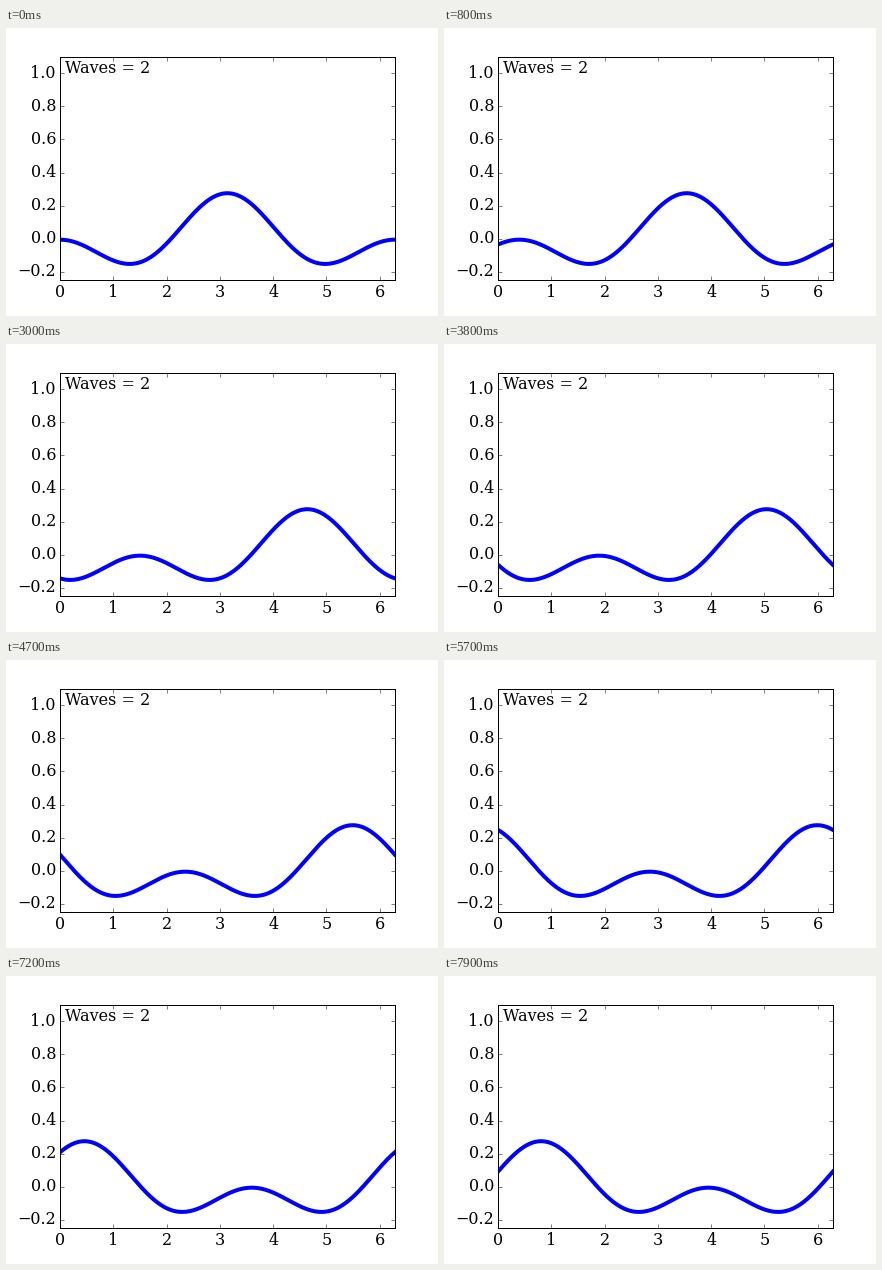
Recreate the animation shown at these times as a matplotlib script. Size 432x288 px, loop 8 s.

```python
import numpy as np
import matplotlib.pyplot as plt
from matplotlib.animation import FuncAnimation

FRAMES, INTERVAL = 80, 100
STEP = 0.05                 # phase shift per frame, in radians
AMPS = (0.1405, 0.1345)     # amplitudes of the first two harmonics

plt.style.use("classic")
plt.rcParams.update({
    "font.family": "DejaVu Serif",
    "font.size": 16,
    "xtick.labelsize": 16,
    "ytick.labelsize": 16,
    "figure.facecolor": "white",
    "figure.subplot.bottom": 0.125,
    "savefig.dpi": "figure",
})

x = np.linspace(0, 2 * np.pi, 400)


def wave(shift):
    u = x - np.pi - shift
    return sum(a * np.cos(k * u) for k, a in enumerate(AMPS, 1))


fig, ax = plt.subplots(figsize=(6, 4), dpi=72)
line, = ax.plot(x, wave(0), color="blue", lw=4)
ax.text(0.1, 1.0, f"Waves = {len(AMPS)}")
ax.set_xticks(np.arange(7))
ax.set_yticks(np.arange(-1, 6) * 0.2)
ax.set_xlim(0, 2 * np.pi)
ax.set_ylim(-0.25, 1.1)


def update(i):
    line.set_ydata(wave(STEP * i))
    return line,


anim = FuncAnimation(fig, update, frames=FRAMES, interval=INTERVAL,
                     repeat=True, repeat_delay=0)
plt.show()
```
